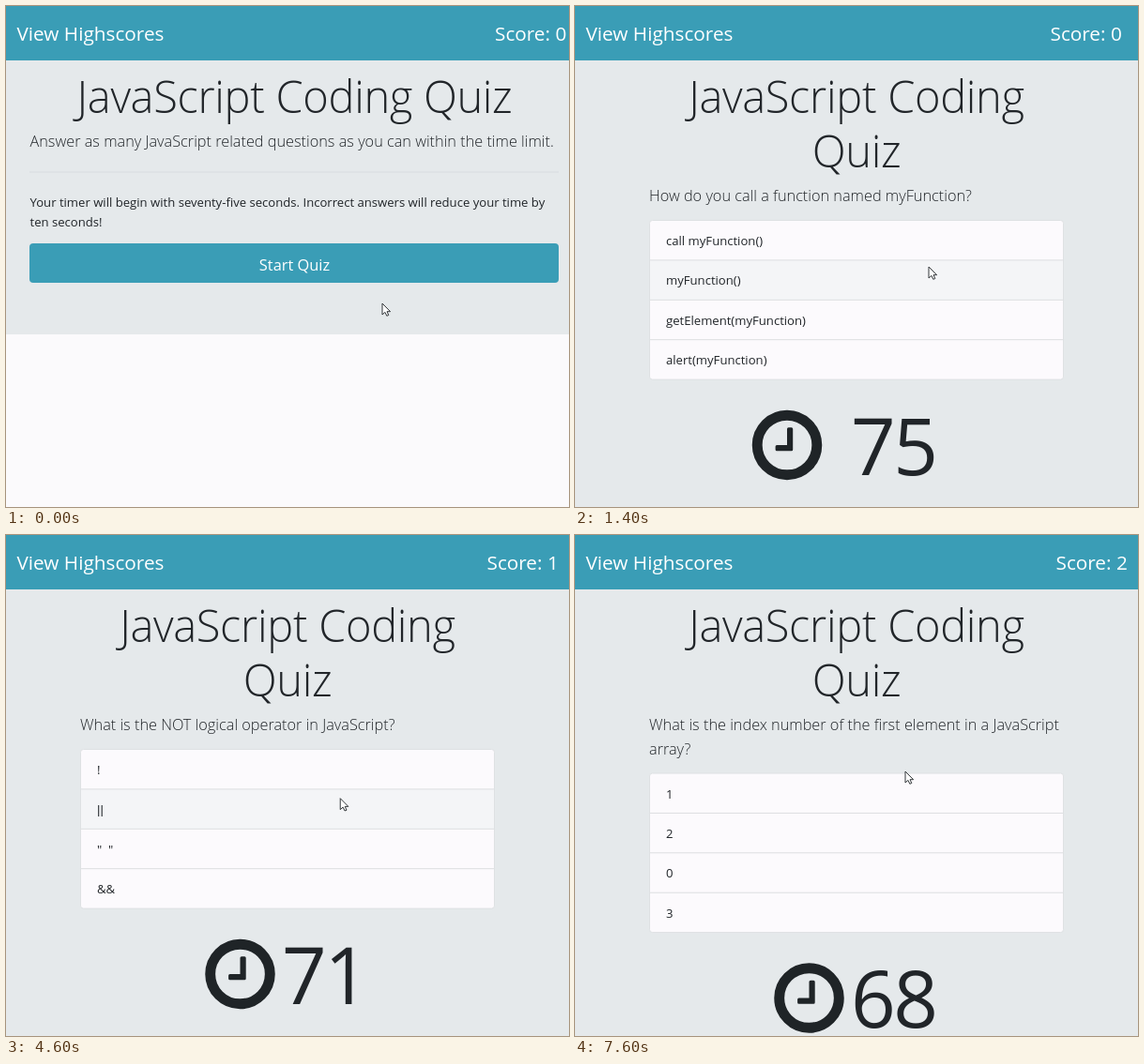
Recreate the animation shown at these times as an HTML page. Size 600 by 534 pixels, loop 8000 ms.

```html
<!DOCTYPE html>
<html lang="en">
<head>
<meta charset="utf-8">
<title>JavaScript Coding Quiz</title>
<style>
  html, body { margin: 0; width: 100%; height: 100%; overflow: hidden; background: #e5e9eb; }
  svg { display: block; width: 100%; height: 100%; }
  text { font-family: "Open Sans", "Noto Sans", sans-serif; fill: #212529; white-space: pre; }
  .nav { font-size: 20.75px; fill: #fff; }
  .title { font-size: 47px; font-weight: 300; letter-spacing: -.35px; text-anchor: middle; }
  .lead { font-size: 16.3px; font-weight: 300; }
  .body { font-size: 13.12px; }
  .button { font-size: 16.4px; fill: #fff; text-anchor: middle; }
  .bars { font-family: "Liberation Sans", Arial, sans-serif; }
  .time { font-size: 83.5px; letter-spacing: -2.5px; }
</style>
</head>
<body>
<svg id="stage" viewBox="0 0 600 534"></svg>
<script>
const LOOP = 8000, STEP = 200;
const ROW = 42.4, LIST_X = 79.5, LIST_W = 441;
const QUIZ_START = 600;
const CLICKS = [3000, 6400];

const QUESTIONS = [
  { from: QUIZ_START, score: 0, lines: ['How do you call a function named myFunction?'],
    options: ['call myFunction()', 'myFunction()', 'getElement(myFunction)', 'alert(myFunction)'] },
  { from: 3200, score: 1, lines: ['What is the NOT logical operator in JavaScript?'],
    options: ['!', '||', '"\u00a0\u00a0"', '&amp;&amp;'] },
  { from: 6600, score: 2,
    lines: ['What is the index number of the first element in a JavaScript', 'array?'],
    options: ['1', '2', '0', '3'] },
];

// Pointer path: time, x, y
const PATH = [
  [0, 401, 317], [200, 391, 301], [400, 377, 279], [1400, 377, 278], [2000, 377, 278],
  [2600, 357, 286], [4400, 357, 286], [5200, 352, 252], [LOOP, 352, 252],
];

const text = (x, y, cls, str) => `<text x="${x}" y="${y}" class="${cls}">${str}</text>`;
const rect = (x, y, w, h, fill, extra = '') =>
  `<rect x="${x}" y="${y}" width="${w}" height="${h}" fill="${fill}" ${extra}/>`;

function pointerAt(t) {
  const i = PATH.findIndex(key => key[0] > t);
  const [t0, x0, y0] = PATH[i - 1], [t1, x1, y1] = PATH[i];
  const k = (t - t0) / (t1 - t0), ease = k * k * (3 - 2 * k);
  return { x: x0 + (x1 - x0) * ease, y: y0 + (y1 - y0) * ease };
}

function header(scoreX, score) {
  return rect(0, 0, 600, 58, '#3a9db6') +
    text(11.5, 37, 'nav', 'View Highscores') +
    text(scoreX, 37, 'nav', `Score: ${score}`);
}

function intro(pointer) {
  const hover = pointer.y > 253 && pointer.y < 295;
  return rect(0, 350, 600, 184, '#fbfafc') +
    header(521, 0) +
    text(307.5, 114, 'title', 'JavaScript Coding Quiz') +
    text(25.5, 150, 'lead',
      'Answer as many JavaScript related questions as you can within the time limit.') +
    rect(25, 176.5, 564, 1, '#d8dcdf') +
    text(25.5, 214, 'body',
      'Your timer will begin with seventy-five seconds. Incorrect answers will reduce your time by') +
    text(25.5, 235, 'body', 'ten seconds!') +
    rect(25, 253, 564, 42, hover ? '#2e8296' : '#3a9db6', 'rx="4"') +
    text(307.5, 281.5, 'button', 'Start Quiz');
}

function optionList(options, top, hovered, pressed) {
  let out = rect(LIST_X, top, LIST_W, ROW * 4, '#fcfafd', 'rx="3"');
  if (options[hovered]) {
    out += rect(LIST_X, top + hovered * ROW, LIST_W, ROW, pressed ? '#e6e8e9' : '#f4f5f7', 'rx="2"');
  }
  for (let i = 1; i < 4; i++) out += rect(LIST_X, top + i * ROW - 0.5, LIST_W, 1, '#dcdee0');
  out += rect(LIST_X, top, LIST_W, ROW * 4, 'none', 'rx="3" stroke="#dee1e3"');
  if (pressed && options[hovered]) {
    out += rect(LIST_X, top + hovered * ROW, LIST_W, ROW + 0.5, 'none', 'stroke="#c9cccd"');
  }
  return out + options.map((option, i) =>
    text(97, top + i * ROW + 26.5, option === '||' ? 'body bars' : 'body', option)).join('');
}

function clock(x, y) {
  return `<g transform="translate(${x} ${y})" fill="#1f2427">
    <circle r="31.8" fill="none" stroke="#1f2427" stroke-width="10.9"/>
    <path d="M1.5-18.7H4.7Q6.2-18.7 6.2-17.2V4.7Q6.2 6.2 4.7 6.2H-10.9Q-12.4 6.2-12.4 4.7V1.5Q-12.4 0-10.9 0H0V-17.2Q0-18.7 1.5-18.7Z"/></g>`;
}

function quiz(t, pointer, pressed) {
  const { lines, options, score } = QUESTIONS.filter(q => q.from <= t).pop();
  const shift = (lines.length - 1) * 25.5;
  const top = 228.5 + shift;
  const seconds = 75 - Math.floor((t - QUIZ_START) / 1000);
  return header(score ? 512.5 : 506.5, score) +
    text(300, 114, 'title', 'JavaScript Coding') +
    text(300, 172, 'title', 'Quiz') +
    lines.map((line, i) => text(79, 208 + i * 25.5, 'lead', line)).join('') +
    optionList(options, top, Math.floor((pointer.y - top) / ROW), pressed) +
    clock(seconds === 75 ? 226 : 249.5, 468 + shift) +
    text(294, 499.5 + shift, 'time', seconds);
}

function cursor({ x, y }, hand) {
  const shape = hand
    ? 'M-.5 1Q.7-.4 1.9 1V5.5L6 6.6Q7.5 7 7.5 8.7V11L6.2 14.5H1L-3 9Q-2.7 7.5-.5 8.8Z'
    : 'M0 0V12L2.9 9.4 4.8 13.3 6.8 12.5 5 8.7H8.6Z';
  return `<path transform="translate(${x} ${y})" d="${shape}" fill="#fff" stroke="#33373a" stroke-linejoin="round"/>`;
}

const ring = ({ x, y }) =>
  `<circle cx="${x + 0.5}" cy="${y + 1.5}" r="28" fill="none" stroke="#ec8283" stroke-width="3"/>`;

function scene(t) {
  const pointer = pointerAt(t);
  const pressed = CLICKS.includes(t);
  const started = t >= QUIZ_START;
  return rect(0, 0, 600, 534, '#e5e9eb') +
    (started ? quiz(t, pointer, pressed) : intro(pointer)) +
    (pressed ? ring(pointer) : '') +
    cursor(pointer, !started && t >= 400);
}

const stage = document.getElementById('stage');
const startTime = performance.now();
let shown = -1;

function tick() {
  const elapsed = (performance.now() - startTime) % LOOP;
  const t = Math.floor(elapsed / STEP) * STEP;
  if (t !== shown) stage.innerHTML = scene(shown = t);
  requestAnimationFrame(tick);
}
tick();
</script>
</body>
</html>
```
